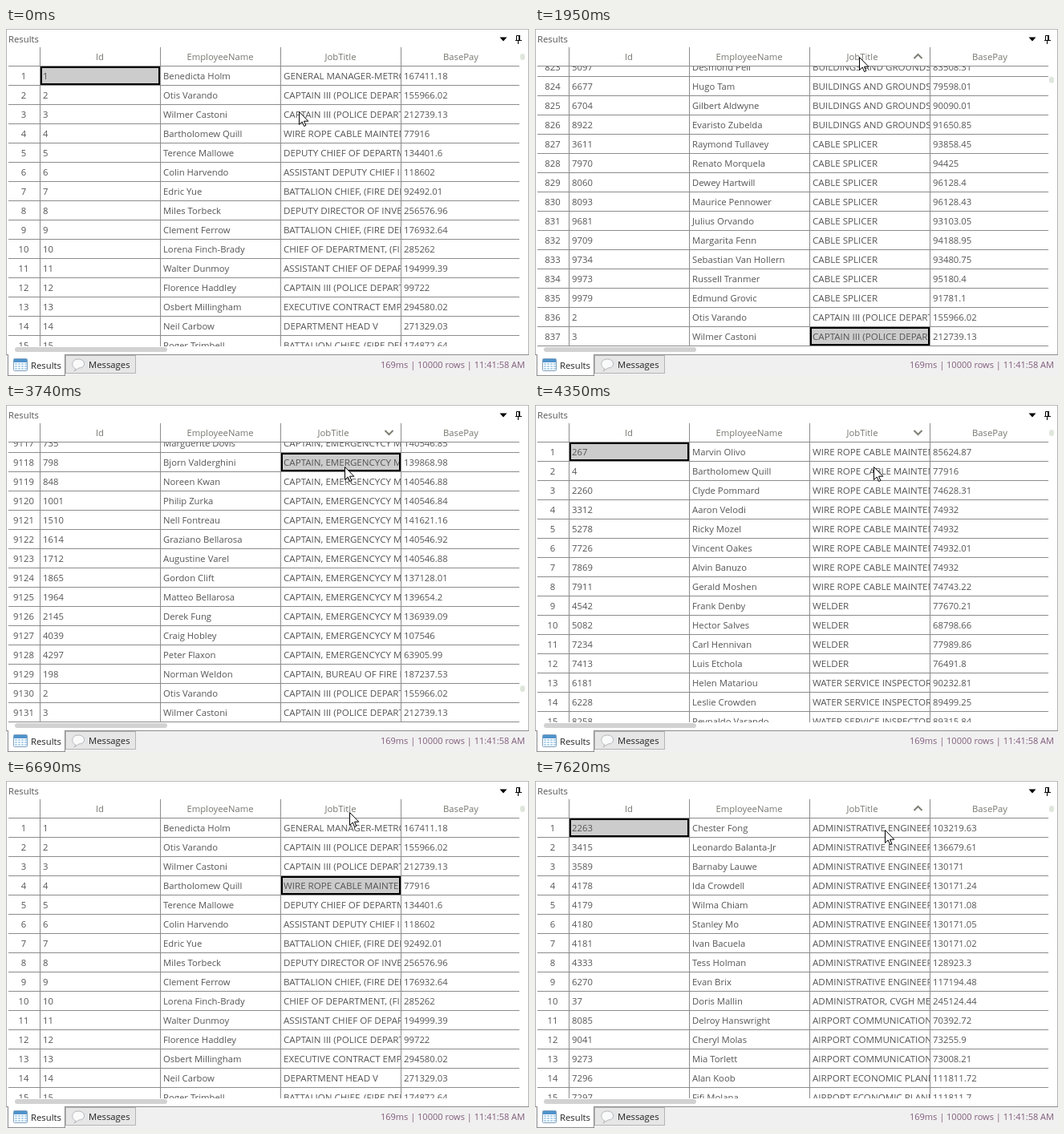
Write an HTML page that moves like this. It is 652 px wide and 434 px high and loops after 8000 ms.

```html
<!DOCTYPE html>
<html lang="en">
<head>
<meta charset="utf-8">
<title>Results grid</title>
<style>
html, body { margin: 0; width: 100%; height: 100%; overflow: hidden; background: #fff; }
svg { display: block; width: 652px; height: 434px; }
text { font: 11.3px "Open Sans", "Noto Sans", sans-serif; fill: #555; white-space: pre; }
.head { fill: #77776f; text-anchor: middle; }
.num { text-anchor: middle; }
.title { font-size: 11.6px; }
.tab { fill: #222; }
.status { font-size: 11px; fill: #805c7c; text-anchor: end; }
.line { stroke: #8c8c8c; shape-rendering: crispEdges; }
</style>
</head>
<body>
<svg id="stage" viewBox="0 0 652 434" xmlns="http://www.w3.org/2000/svg"></svg>
<script>
const LOOP = 8000, ROW = 24, TOP = 48, BOTTOM = 397;
const COLS = [42, 192, 342, 492, 640];

// One row per line: id | name | pay | title; an absent title repeats the one above.
const parse = text => {
  let title = '';
  return text.trim().split('\n').map(line => {
    const [id, name, pay, job] = line.split('|');
    title = job || title;
    return [id, name, title, pay];
  });
};

const unsorted = parse(`
1|Benedicta Holm|167411.18|GENERAL MANAGER-METROPOLITAN
2|Otis Varando|155966.02|CAPTAIN III (POLICE DEPARTMENT)
3|Wilmer Castoni|212739.13
4|Bartholomew Quill|77916|WIRE ROPE CABLE MAINTENANCE
5|Terence Mallowe|134401.6|DEPUTY CHIEF OF DEPARTMENT
6|Colin Harvendo|118602|ASSISTANT DEPUTY CHIEF II
7|Edric Yue|92492.01|BATTALION CHIEF, (FIRE DEPARTMENT)
8|Miles Torbeck|256576.96|DEPUTY DIRECTOR OF INVESTMENTS
9|Clement Ferrow|176932.64|BATTALION CHIEF, (FIRE DEPARTMENT)
10|Lorena Finch-Brady|285262|CHIEF OF DEPARTMENT, (FIRE)
11|Walter Dunmoy|194999.39|ASSISTANT CHIEF OF DEPARTMENT
12|Florence Haddley|99722|CAPTAIN III (POLICE DEPARTMENT)
13|Osbert Millingham|294580.02|EXECUTIVE CONTRACT EMPLOYEE
14|Neil Carbow|271329.03|DEPARTMENT HEAD V
15|Roger Trimbell|174872.64|BATTALION CHIEF, (FIRE DEPARTMENT)`);
const captains = unsorted.slice(1, 3);

const splicers = parse(`
5097|Desmond Pell|83508.31|BUILDINGS AND GROUNDS MAINTENANCE
6677|Hugo Tam|79598.01
6704|Gilbert Aldwyne|90090.01
8922|Evaristo Zubelda|91650.85
3611|Raymond Tullavey|93858.45|CABLE SPLICER
7970|Renato Morquela|94425
8060|Dewey Hartwill|96128.4
8093|Maurice Pennower|96128.43
9681|Julius Orvando|93103.05
9709|Margarita Fenn|94188.95
9734|Sebastian Van Hollern|93480.75
9973|Russell Tranmer|95180.4
9979|Edmund Grovic|91781.1`).concat(captains);

const medics = parse(`
735|Marguerite Dovis|140546.85|CAPTAIN, EMERGENCYCY MEDICAL
798|Bjorn Valderghini|139868.98
848|Noreen Kwan|140546.88
1001|Philip Zurka|140546.84
1510|Nell Fontreau|141621.16
1614|Graziano Bellarosa|140546.92
1712|Augustine Varel|140546.88
1865|Gordon Clift|137128.01
1964|Matteo Bellarosa|139654.2
2145|Derek Fung|136939.09
4039|Craig Hobley|107546
4297|Peter Flaxon|63905.99
198|Norman Weldon|187237.53|CAPTAIN, BUREAU OF FIRE PREVENTION`).concat(captains);

const descending = parse(`
267|Marvin Olivo|85624.87|WIRE ROPE CABLE MAINTENANCE
4|Bartholomew Quill|77916
2260|Clyde Pommard|74628.31
3312|Aaron Velodi|74932
5278|Ricky Mozel|74932
7726|Vincent Oakes|74932.01
7869|Alvin Banuzo|74932
7911|Gerald Moshen|74743.22
4542|Frank Denby|77670.21|WELDER
5082|Hector Salves|68798.66
7234|Carl Hennivan|77989.86
7413|Luis Etchola|76491.8
6181|Helen Matariou|90232.81|WATER SERVICE INSPECTOR
6228|Leslie Crowden|89499.25
8258|Reynaldo Varando|89315.84`);

const ascending = parse(`
2263|Chester Fong|103219.63|ADMINISTRATIVE ENGINEER
3415|Leonardo Balanta-Jr|136679.61
3589|Barnaby Lauwe|130171
4178|Ida Crowdell|130171.24
4179|Wilma Chiam|130171.08
4180|Stanley Mo|130171.05
4181|Ivan Bacuela|130171.02
4333|Tess Holman|128923.3
6270|Evan Brix|117194.48
37|Doris Mallin|245124.44|ADMINISTRATOR, CVGH MEDICAL
8085|Delroy Hanswright|70392.72|AIRPORT COMMUNICATIONS OPERATOR
9041|Cheryl Molas|73255.9
9273|Mia Torlett|73008.21
7296|Alan Koob|111811.72|AIRPORT ECONOMIC PLANNER
7297|Fifi Molana|111811.7`);

const inspectors = ['Ross Tillbury', 'Dana Okrent', 'Miguel Sarvado', 'Elliot Branmore', 'Judith Pallow',
  'Warren Stoddel', 'Victor Lumares', 'Cecil Ormont', 'Howard Kessing', 'Tomas Bravelo']
  .map((name, i) => [`${8302 + i * 151}`, name, 'WATER SERVICE INSPECTOR', (89315.84 - i * 412.3).toFixed(2)]);

const views = [
  { rows: unsorted, first: 1, sort: '' },
  { rows: splicers, first: 823, sort: 'up' },
  { rows: medics, first: 9117, sort: 'down' },
  { rows: descending, first: 1, sort: 'down' },
  { rows: [...inspectors, ...descending.slice(8, 12), descending[1]], first: 9979, sort: 'up' },
  { rows: ascending, first: 1, sort: 'up' }
];

// Each step changes part of the state: view, selected [row, column], pointer, click ring.
const at = (time, x, y, more) => [time, { x, y, ...more }];
const steps = [
  at(0, 365, 104, { view: 0, sel: [0, 0], ring: false }),
  [80, { sel: [2, 2], ring: true }],
  [150, { ring: false }],
  at(550, 381, 52), at(630, 392, 17),
  at(860, 393, 20), at(940, 396, 25), at(1020, 399, 30), at(1090, 401, 33), at(1170, 402, 35),
  at(1400, 404, 36),
  [1570, { ring: true }],
  [1720, { ring: false }],
  [1950, { view: 1, sel: [14, 2] }],
  [3200, { view: 2 }],
  at(3430, 408, 46), at(3510, 417, 66), at(3590, 422, 78),
  [3660, { sel: [1, 2], ring: true }],
  [3740, { ring: false }],
  [4350, { view: 3, sel: [0, 0] }],
  [5210, { sel: [1, 2], ring: true }],
  [5280, { ring: false }],
  at(5350, 423, 66), at(5430, 425, 46), at(5500, 426, 34), at(5580, 426, 30),
  [5750, { ring: true }],
  [5820, { ring: false }],
  [5900, { view: 0, sel: [3, 2] }],
  [6450, { ring: true }],
  [6520, { ring: false }],
  at(6690, 428, 40),
  at(6760, 432, 52, { view: 4, sel: [14, 2] }),
  at(6830, 435, 60), at(6900, 436, 62),
  [6990, { sel: [1, 2], ring: true }],
  [7070, { ring: false }],
  [7620, { view: 5, sel: [0, 0] }]
];

const rect = (x, y, w, h, fill, more = '') => `<rect x="${x}" y="${y}" width="${w}" height="${h}" fill="${fill}" ${more}/>`;
const text = (x, y, value, more = '') => `<text x="${x}" y="${y}" ${more}>${value}</text>`;
const line = (x1, y1, x2, y2) => `<path class="line" d="M${x1} ${y1}L${x2} ${y2}"/>`;
const head = (x, value, id = '') => text(x, 40, value, `class="head" id="${id}"`);
const rowTop = (view, i) => TOP + i * ROW - (view.first > 1 ? 11 : 0);

const drawCell = (value, c, y) =>
  `<g clip-path="url(#col${c})">${text(COLS[c] + 4, y, value, c === 2 ? 'class="title"' : '')}</g>`;

const drawView = (view, index) => `<g id="view${index}">` + view.rows.map((cells, i) => {
  const y = rowTop(view, i);
  return line(3, y + 23.5, 640, y + 23.5)
    + text(22, y + 16, view.first + i, 'class="num"')
    + cells.map((value, c) => drawCell(value, c, y + 16)).join('');
}).join('') + '</g>';

const gridIcon = rect(9.5, 412.5, 17, 15, '#fff', 'rx="1" stroke="#7f9fbd"')
  + rect(10, 413, 16, 4, '#4f93cc')
  + [0, 1, 2].map(r => [0, 1, 2, 3].map(c => rect(11 + c * 4, 418 + r * 3, 3, 2, '#b4d5ec')).join('')).join('');

const clips = [0, 1, 2, 3].map(c =>
  `<clipPath id="col${c}">${rect(COLS[c] + 1, TOP, COLS[c + 1] - COLS[c] - 1, BOTTOM - TOP, '#000')}</clipPath>`).join('');

const stage = document.getElementById('stage');
stage.innerHTML = `<defs>${clips}<clipPath id="body">${rect(0, TOP, 652, BOTTOM - TOP, '#000')}</clipPath></defs>`
  + rect(0, 0, 652, 434, '#fff')
  + text(3, 18, 'Results')
  + '<path d="M615.5 11.5h9l-4.5 5z"/>'
  + '<path d="M636.5 15V9.5H641M640.5 9.5V15M639.5 9.5V15M635 15.5H643M638.5 16V20" fill="none" stroke="#000"/>'
  + '<g clip-path="url(#body)">' + rect(0, 0, 149, 23, '#ccc', 'id="fill"') + views.map(drawView).join('')
  + '</g>'
  + line(3, 47.5, 640, 47.5)
  + COLS.slice(0, 4).map(x => line(x + .5, 24, x + .5, BOTTOM)).join('')
  + rect(0, 0, 147, 21, 'none', 'id="frame" stroke="#000" stroke-width="2"')
  + head(117, 'Id') + head(267, 'EmployeeName') + head(417, 'JobTitle', 'job') + head(567, 'BasePay')
  + '<path id="chevron" fill="none" stroke="#7d7f74" stroke-width="2"/>'
  + rect(641, 32, 6, 8, '#dfe7dd', 'rx="3" id="thumb"')
  + rect(11, 398, 190, 6, '#d2d2d2', 'rx="3"')
  + rect(0, 407, 652, 27, '#f0f0f0')
  + line(0, 407.5, 652, 407.5)
  + rect(2.5, 407.5, 71, 26, '#fff', 'stroke="#8c8c8c"') + rect(3, 406, 70, 3, '#fff')
  + rect(74.5, 408.5, 87, 22, '#e6e6e6', 'stroke="#b5b5b5"')
  + gridIcon
  + '<path d="M87 425c-6-2-6-12 3-12 10 0 10 11 1 11l-6 4z" fill="#fafafa" stroke="#b4b8bd"/>'
  + text(31, 425, 'Results', 'class="tab"')
  + text(103, 424, 'Messages', 'class="tab"')
  + text(647, 424, '169ms | 10000 rows | 11:41:58 AM', 'class="status"')
  + '<path class="line" d="M0 1.5H652M.5 1V407M651.5 1V407" style="stroke:#b4b4b4"/>'
  + '<g id="pointer"><circle id="ring" r="11" fill="none" stroke="#333"/>'
  + '<path transform="translate(.5 .5)" d="M0 0V16L3.7 12.5 6.1 18 8.4 17 6 11.7H11.3Z" fill="#fff" stroke="#000"/></g>';

const el = Object.fromEntries([...stage.querySelectorAll('[id]')].map(node => [node.id, node]));
const set = (node, attrs) => Object.entries(attrs).forEach(([key, value]) => node.setAttribute(key, value));
const show = (node, on) => { node.style.display = on ? '' : 'none'; };
const chevrons = { up: 'M472.5 38l5-5 5 5', down: 'M472.5 33l5 5 5-5', '': '' };

function render(time) {
  const state = Object.assign({}, ...steps.filter(step => step[0] <= time).map(step => step[1]));
  const view = views[state.view];
  views.forEach((_, i) => show(el['view' + i], i === state.view));
  const [row, col] = state.sel;
  const x = COLS[col] + 1, y = rowTop(view, row);
  set(el.fill, { x, y });
  set(el.frame, { x: x + 1, y: y + 1 });
  set(el.job, { x: view.sort ? 408 : 417 });
  set(el.chevron, { d: chevrons[view.sort] });
  set(el.thumb, { y: 32 + (view.first - 1) * .035 });
  set(el.pointer, { transform: `translate(${state.x} ${state.y})` });
  show(el.ring, state.ring);
}

const start = performance.now();
function tick() {
  render((performance.now() - start) % LOOP);
  requestAnimationFrame(tick);
}
tick();
</script>
</body>
</html>
```
